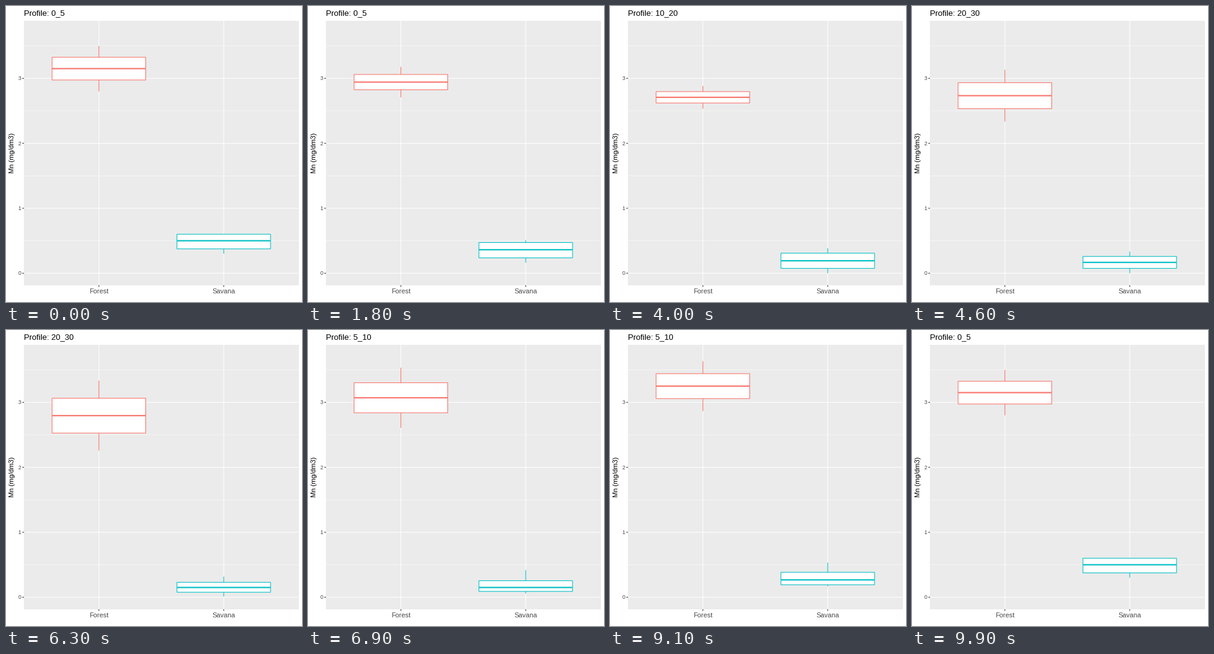
Recreate the animation shown at these times as a matplotlib script. Size 480 by 480 pixels, loop 10000 ms.

```python
import numpy as np
import matplotlib.pyplot as plt
from matplotlib.animation import FuncAnimation
from matplotlib.patches import Rectangle

plt.rcParams["font.family"] = "Liberation Sans"

SIZE, DPI = 480, 72          # at 72 dpi one point is one pixel
FRAMES, INTERVAL = 100, 100

LEFT, RIGHT, TOP, BOTTOM = 29.2, 474.52, 24.1, 452.8
ZERO, UNIT = 433.33, 105.33
CENTERS = [LEFT + (RIGHT - LEFT) * k / 2.2 for k in (0.6, 1.6)]
HALF = (RIGHT - LEFT) / 2.2 * 0.375
COLORS = ("#F8766D", "#00BFC4")
THIN, LINE, THICK = 0.53, 1.07, 2.13

# Five-number summaries per depth: forest row, savana row
STATES = [
    ("0_5", [[2.8, 2.975, 3.15, 3.325, 3.5], [0.3, 0.375, 0.5, 0.6, 0.6]]),
    ("10_20", [[2.6, 2.65, 2.7, 2.75, 2.8], [0, 0.075, 0.2, 0.325, 0.4]]),
    ("20_30", [[2.2, 2.475, 2.75, 3.025, 3.3], [0, 0.075, 0.15, 0.225, 0.3]]),
    ("5_10", [[2.9, 3.1, 3.3, 3.5, 3.7], [0.1, 0.1, 0.15, 0.275, 0.5]]),
]
# Start and end frame of each linear transition to the next state
MOVES = [(12, 25), (38, 50), (62, 74), (87, 99)]

fig = plt.figure(figsize=(SIZE / DPI, SIZE / DPI), dpi=DPI, facecolor="white")
ax = fig.add_axes([0, 0, 1, 1])
ax.set_xlim(0, SIZE)
ax.set_ylim(SIZE, 0)
ax.axis("off")


def ypix(value):
    return ZERO - UNIT * np.asarray(value)


def line(xs, ys, color, width, z):
    art, = ax.plot(xs, ys, color=color, lw=width, zorder=z,
                   solid_capstyle="butt", solid_joinstyle="miter")
    art.set_snap(False)
    return art


def text(x, y, label, size, color, **kw):
    return ax.text(x, y, label, fontsize=size, color=color,
                   va="baseline", zorder=6, **kw)


def draw_panel():
    ax.add_patch(Rectangle((29, 24), 446, 429, fc="#EBEBEB", ec="none",
                           antialiased=False, zorder=0))
    for v in (0.5, 1.5, 2.5, 3.5):
        line([LEFT, RIGHT], [ypix(v)] * 2, "white", THIN, 1)
    for v in range(4):
        y = ypix(v)
        line([LEFT, RIGHT], [y, y], "white", LINE, 1)
        line([LEFT - 2.74, LEFT], [y, y], "#333333", LINE, 1)
        text(24.3, y + 3.1, str(v), 8.77, "#4D4D4D", ha="right")
    for x, name in zip(CENTERS, ("Forest", "Savana")):
        line([x, x], [TOP, BOTTOM], "white", LINE, 1)
        line([x, x], [BOTTOM, BOTTOM + 2.74], "#333333", LINE, 1)
        text(x, 466, name, 10.96, "#4D4D4D", ha="center")
    text(13.4, (TOP + BOTTOM) / 2, "Mn (mg/dm3)", 10.96, "black",
         ha="center", rotation=90, rotation_mode="anchor")


class Box:
    def __init__(self, x, color):
        sides = [x - HALF, x + HALF]
        self.lower = line([x, x], [0, 0], color, LINE, 2)
        self.upper = line([x, x], [0, 0], color, LINE, 2)
        self.body = Rectangle((sides[0], 0), 2 * HALF, 0, fc="white",
                              ec=color, lw=LINE, joinstyle="miter", zorder=3)
        self.body.set_snap(False)
        ax.add_patch(self.body)
        self.median = line(sides, [0, 0], color, THICK, 4)

    def update(self, stats):
        low, q1, med, q3, high = ypix(stats)
        self.lower.set_ydata([q1, low])
        self.upper.set_ydata([q3, high])
        self.body.set_y(q3)
        self.body.set_height(q1 - q3)
        self.median.set_ydata([med, med])


def state_at(frame):
    for i, (start, end) in enumerate(MOVES):
        if frame <= end:
            t = max(0, (frame - start) / (end - start))
            (name, a), (after, b) = STATES[i], STATES[(i + 1) % len(STATES)]
            stats = np.array(a) * (1 - t) + np.array(b) * t
            return (after if t > 0.5 else name), stats


draw_panel()
title = text(LEFT, 15, "", 13.15, "black", ha="left")
boxes = [Box(x, c) for x, c in zip(CENTERS, COLORS)]


def update(frame):
    name, stats = state_at(frame)
    title.set_text("Profile: " + name)
    for box, row in zip(boxes, stats):
        box.update(row)
    return [title]


anim = FuncAnimation(fig, update, frames=FRAMES, interval=INTERVAL,
                     repeat=True, repeat_delay=0, blit=False)
plt.show()
```
